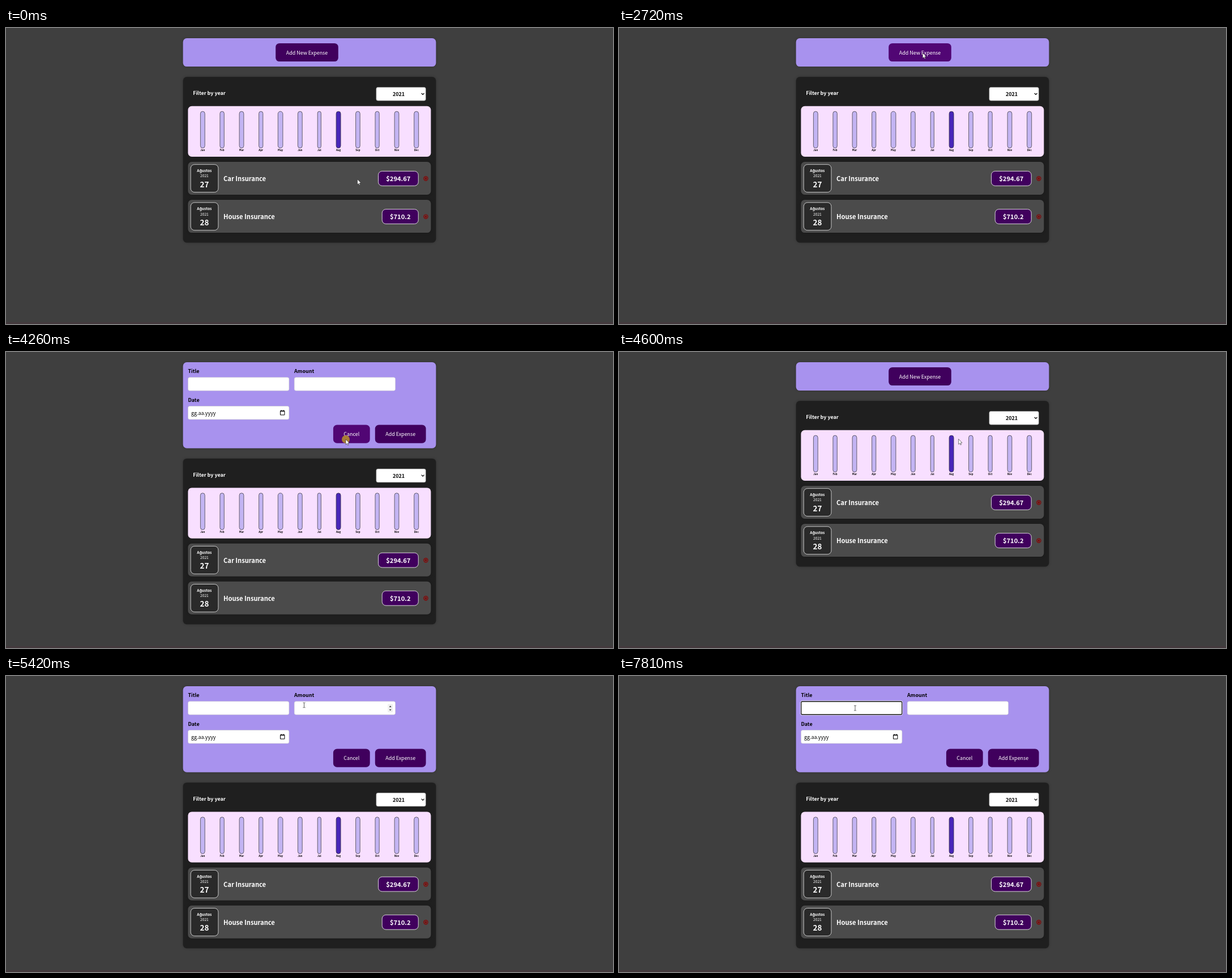
Animation, 1072 px wide and 522 px high, one loop 8000 ms. Source, as an HTML page:

```html
<!DOCTYPE html>
<html lang="en">
<head>
<meta charset="utf-8">
<title>Expense list</title>
<style>
  html, body { margin: 0; width: 100%; height: 100%; overflow: hidden; background: #3f3f3f; }
  svg { display: block; width: 1072px; height: 522px; }
  text {
    font-family: 'Noto Sans CJK JP', 'Noto Sans CJK SC', 'Noto Sans CJK', 'Noto Sans', sans-serif;
    font-size: 8.93px;
  }
  .bold { font-weight: 700; }
  .mid { text-anchor: middle; }
  .card { filter: drop-shadow(0 .6px 2.2px rgba(0, 0, 0, .25)); }
</style>
</head>
<body>
<svg id="stage" viewBox="0 0 1072 522"></svg>
<script>
const LOOP = 8000;
const LIST_SHIFT = 101.7;
const DARK = '#40005d', HOVER = '#510674';

const rect = (x, y, w, h, r, fill, extra = '') =>
  `<rect x="${x}" y="${y}" width="${w}" height="${h}" rx="${r}" fill="${fill}" ${extra}/>`;
const text = (x, y, label, fill, cls = '', size = 8.93) =>
  `<text x="${x}" y="${y}" fill="${fill}" class="${cls}" style="font-size:${size}px">${label}</text>`;
const button = (id, x, y, w, h, label) =>
  rect(x, y, w, h, 6.7, DARK, `id="${id}"`) + text(x + w / 2, y + h / 2 + 3.5, label, '#fff', 'mid');
const input = (x, y) =>
  rect(x, y, 178.4, 23.4, 3, '#fff', 'stroke="#ccc" stroke-width=".56"');

function bars() {
  const months = 'Jan Feb Mar Apr May Jun Jul Aug Sep Oct Nov Dec'.split(' ');
  const centers = [347.3, 381.6, 416, 450.2, 484.6, 519.3, 553.3, 587.1, 621.4, 655.6, 690, 724.7];
  const widths = [7.8, 7.4, 7.8, 7.2, 8.6, 7.8, 6.2, 8, 7.6, 7.2, 7.8, 8];
  return months.map((month, i) =>
    rect(centers[i] - widths[i] / 2, 147.1, widths[i], 64.6, widths[i] / 2,
      month === 'Aug' ? '#4826b9' : '#c3b4f3', 'stroke="#313131" stroke-width=".7"') +
    text(centers[i], 216.9, month, '#000', 'mid bold', 4.47)).join('');
}

function expense(y, day, title, price, priceX) {
  const priceW = 728.2 - priceX;
  return rect(321.4, y, 429, 58, 6.7, '#4b4b4b', 'class="card"') +
    rect(326.2, y + 4.7, 48.7, 48.9, 6.7, '#2a2a2a', 'stroke="#ececec" stroke-width=".8"') +
    text(350.4, y + 17.9, 'Ağustos', '#fff', 'mid bold', 6.7) +
    text(350.4, y + 27.4, '2021', '#fff', 'mid', 6.7) +
    text(350.4, y + 44.5, day, '#fff', 'mid bold', 13.4) +
    text(384, y + 34, title, '#fff', 'bold', 11.17) +
    rect(priceX, y + 16.5, priceW, 25.8, 6.7, DARK, 'stroke="#fff" stroke-width=".8"') +
    text(priceX + priceW / 2, y + 34, price, '#fff', 'mid bold', 11.17) +
    `<g transform="translate(741.4 ${y + 29.5})" fill="none" stroke="#8b0000">
      <circle r="3.6" stroke-width="1.2"/><path d="M-1.6-1.6 1.6 1.6M1.6-1.6-1.6 1.6" stroke-width="1.5"/></g>`;
}

const closedPanel = `<g id="closed">
  ${rect(312.6, 18, 446.8, 50.1, 6.7, '#a892ee', 'class="card"')}
  ${button('open', 476.2, 26.9, 110.6, 32.2, 'Add New Expense')}</g>`;

const formPanel = `<g id="form">
  ${rect(312.6, 18, 446.8, 151.8, 6.7, '#a892ee', 'class="card"')}
  ${text(321.4, 37.3, 'Title', '#000', 'bold')}${input(321.5, 44.8)}
  ${text(509.1, 37.3, 'Amount', '#000', 'bold')}${input(509.2, 44.8)}
  ${text(321.4, 87.7, 'Date', '#000', 'bold')}${input(321.5, 95.5)}
  ${text(327, 111.2, 'gg.aa.yyyy', '#000')}
  <path d="M484.5 103.8h7.4v7.2h-7.4zM484.5 104.6h7.4M486.2 102.2v1.5M490.2 102.2v1.5" fill="none" stroke="#000"/>
  <g id="spinner">${rect(674.2, 49.5, 9, 14.4, 1, '#efefef')}
    <path d="M676.7 54.9h4l-2-2.6zM676.7 58.7h4l-2 2.6z" fill="#444"/></g>
  <g id="focus">${rect(321.4, 44.7, 178.6, 23.6, 2.5, 'none', 'stroke="#fff" stroke-width="2.2"')}
    ${rect(321.7, 45, 178, 23, 2, 'none', 'stroke="#101010" stroke-width="1.3"')}</g>
  ${rect(326, 50, 1, 13, 0, '#000', 'id="caret"')}
  ${button('cancel', 577.9, 128.6, 64.8, 32.2, 'Cancel')}
  ${button('add', 651.8, 128.6, 89.8, 32.2, 'Add Expense')}</g>`;

const list = `<g id="list">
  ${rect(312.6, 86.2, 446.8, 292.3, 6.7, '#1f1f1f', 'class="card"')}
  ${text(330.2, 117.9, 'Filter by year', '#fff', 'bold')}
  ${rect(653.8, 104.4, 87.6, 23.8, 3, '#fff', 'stroke="#767676" stroke-width=".6"')}
  ${text(693.5, 120, '2021', '#000', 'mid bold')}
  <path d="M733.7 115l2.4 2.5 2.4-2.5" fill="none" stroke="#000" stroke-width="1.2"/>
  ${rect(321.4, 137.7, 429, 89.3, 6.7, '#f8dfff')}
  ${bars()}
  ${expense(236, '27', 'Car Insurance', '$294.67', 657.5)}
  ${expense(303.1, '28', 'House Insurance', '$710.2', 664.2)}</g>`;

const pointer = `<g id="pointer">
  <circle id="click" r="7" fill="#b8902a" opacity=".85"/>
  <path id="arrow" d="M0 0V9.3L2.1 7.4 3.5 10.4 4.9 9.8 3.6 6.8 6.4 6.6Z" fill="#fff" stroke="#222" stroke-width=".6"/>
  <path id="beam" d="M-2-4.3H-.6L0-3.8 .6-4.3H2M0-3.8V3.9M-2 4.4H-.6L0 3.9 .6 4.4H2" fill="none" stroke="#333" stroke-width=".8"/></g>`;

const stage = document.getElementById('stage');
stage.innerHTML = rect(0, 0, 1072, 522, 0, '#3f3f3f') + rect(0, 519, 1072, 3, 0, '#44393d') +
  closedPanel + formPanel + list + pointer;

const el = {};
stage.querySelectorAll('[id]').forEach(node => el[node.id] = node);

// Pointer moves: start, end, destination x, y
const START = [620.6, 266.8];
const MOVES = [
  [820, 970, 627, 261.2],
  [1470, 2250, 536.3, 44],
  [3620, 4070, 600, 154],
  [4580, 5090, 526.5, 51.3],
  [5540, 5890, 417, 56.5],
];
const CLICKS = [[2560, 2720], [4100, 4290], [5280, 5420], [6260, 6390]];
const FORM_OPEN = [[2750, 4290], [5420, LOOP]];
const CARET_ON = [[6260, 6790], [7290, 7810]];

const during = (spans, t) => spans.some(([from, to]) => t >= from && t < to);
const show = (node, on) => node.setAttribute('visibility', on ? 'visible' : 'hidden');
const inside = ([x, y], left, top, right, bottom) => x >= left && x <= right && y >= top && y <= bottom;

function pointerAt(t) {
  let [x, y] = START;
  for (const [from, to, toX, toY] of MOVES) {
    const p = Math.min(1, Math.max(0, (t - from) / (to - from)));
    const eased = p * p * (3 - 2 * p);
    x += (toX - x) * eased;
    y += (toY - y) * eased;
  }
  return [x, y];
}

function draw(t) {
  const pos = pointerAt(t);
  const open = during(FORM_OPEN, t);
  const overAmount = open && inside(pos, 509, 44.5, 688, 68.5);
  const overTitle = open && inside(pos, 321, 44.5, 500, 68.5);
  const beam = overAmount || overTitle || (t >= 5390 && t < 5420);

  el.closed.style.display = open ? 'none' : '';
  el.form.style.display = open ? '' : 'none';
  el.list.setAttribute('transform', `translate(0 ${open ? LIST_SHIFT : 0})`);
  el.open.setAttribute('fill', inside(pos, 476, 27, 587, 59) ? HOVER : DARK);
  el.cancel.setAttribute('fill', inside(pos, 578, 128.5, 643, 161) ? HOVER : DARK);

  show(el.spinner, overAmount);
  show(el.focus, t >= 6260);
  show(el.caret, during(CARET_ON, t));
  show(el.click, during(CLICKS, t));
  show(el.arrow, !beam);
  show(el.beam, beam);
  el.pointer.setAttribute('transform', `translate(${pos[0]} ${pos[1]})`);
}

const began = performance.now();
function tick() {
  draw((performance.now() - began) % LOOP);
  requestAnimationFrame(tick);
}
tick();
</script>
</body>
</html>
```
